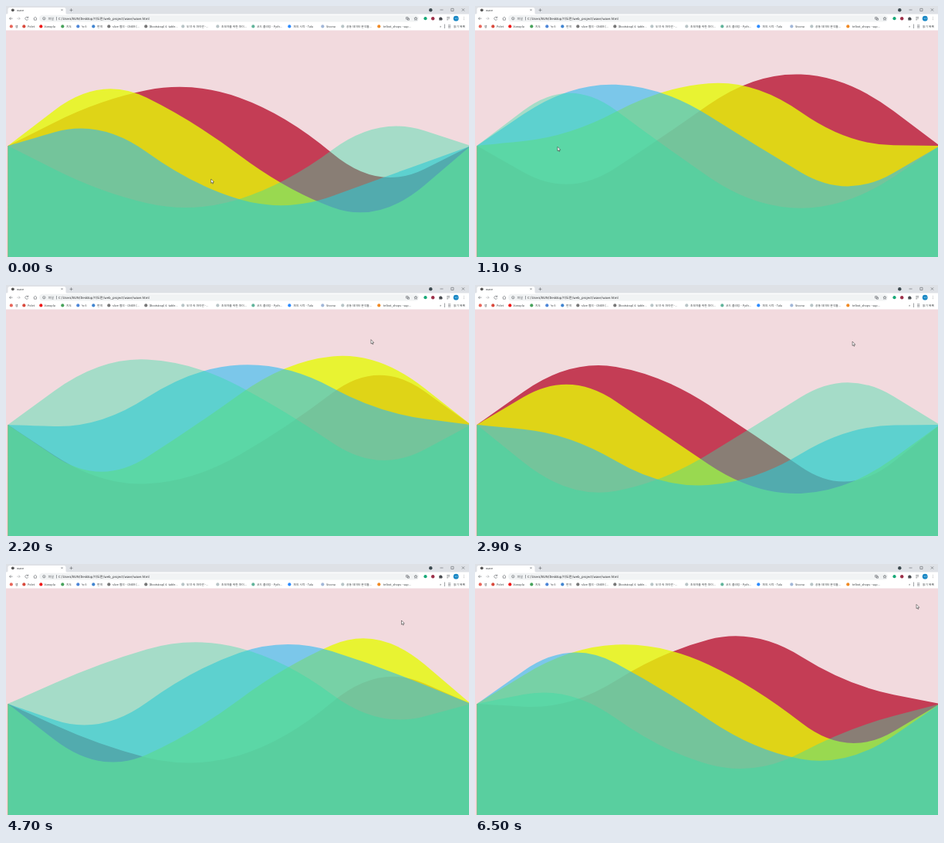
Recreate the animation shown at these times as an HTML page. Size 600x325 px, loop 6.6 s.

```html
<!DOCTYPE html>
<html lang="ko">
<head>
<meta charset="utf-8">
<title>wave</title>
<style>
  html, body { margin: 0; width: 100%; height: 100%; overflow: hidden; background: #f2dade; }
  svg { display: block; width: 100vw; height: 100vh; }
  text { font-family: "Noto Sans CJK KR", "Noto Sans CJK", "Open Sans", sans-serif; text-rendering: geometricPrecision; fill: #3c4043; }
  .line { fill: none; stroke: #5f6368; stroke-width: .6; }
</style>
</head>
<body>
<svg viewBox="0 0 600 325" preserveAspectRatio="none">
  <rect width="600" height="325" fill="#f2dade"/>
  <g id="waves"></g>
  <g id="browser">
    <rect width="600" height="11" fill="#dee1e6"/>
    <path d="M0 11Q2.5 11 2.5 8.500V4.500Q2.500 2 5 2H75Q77.500 2 77.500 4.500V8.500Q77.500 11 80 11Z" fill="#fff"/>
    <rect y="10.500" width="600" height="21" fill="#fff"/>
    <rect x="43" y="11.700" width="492" height="8.800" rx="4.400" fill="#f1f3f4"/>
    <path class="line" d="M71.500 4.200l2 2m0-2l-2 2M82.500 5.300h4m-2-2v4"/>
    <path class="line" d="M562.500 5h4M576.800 3.300h3.200v3.200h-3.200zM590.800 3.300l3.300 3.300m0-3.300l-3.300 3.300"/>
    <path class="line" d="M8.500 16.200h-4m1.800-1.800l-1.800 1.800 1.800 1.800"/>
    <path class="line" d="M14.200 16.200h4m-1.800-1.800l1.800 1.800-1.800 1.800" opacity=".5"/>
    <path class="line" d="M28.500 15.100a2 2 0 1 0 .2 1.900M28.800 13.600v1.700h-1.700"/>
    <path class="line" d="M35.700 16.200l2.200-2 2.200 2M36.400 16v2.200h3V16"/>
    <circle class="line" cx="49.300" cy="16.200" r="1.700"/>
    <path class="line" d="M49.300 15.900v1.300M65.500 14v4.500"/>
    <path class="line" d="M518.500 14.500h2.500v2.500h-2.500zM520.300 16h2.200v2.200h-2.200z"/>
    <path class="line" d="M531 14.200l.6 1.500 1.500.1-1.200 1 .4 1.500-1.300-.8-1.300.8.4-1.500-1.200-1 1.500-.1z"/>
    <path d="M561.300 15h1.200a.8.800 0 0 1 1.600 0h1v1.200a.8.800 0 0 1 0 1.600v.8h-3.800z" fill="#4a4d51"/>
    <path class="line" d="M571.200 14.500h4M571.200 16.200h4M571.200 17.900h2"/>
    <path class="line" d="M568.500 23.500v5.500M573 24.800h3.300M573 26.400h3.300M573 28h3.300"/>
  </g>
  <path id="cursor" d="M0 0V5.400L1.200 4.300 2 6.200 2.900 5.800 2.100 4H3.800Z" fill="#fff" stroke="#222" stroke-width=".5"/>
</svg>
<script>
const LOOP = 6600, STEP = 100;
const LEFT = 2.5, GAP = 120, CENTER = 181, BOTTOM = 326;

const waves = [
  { color: "#c43d55", alpha: 1, swing: [89, 85, 105, 106] },
  { color: "#e6fa08", alpha: 0.8, swing: [93, 84, 101, 102] },
  { color: "#2ebbf3", alpha: 0.6, swing: [90, 91, 87, 84] },
  { color: "#30dea6", alpha: 0.4, swing: [107, 88, 97, 88] },
];

// [time, phase, cursor x, cursor y]
const keys = [
  [0, -2.4, 265.700, 224],
  [1100, 2.27, 107, 182.300],
  [2200, 7.38, 473, 70.700],
  [3700, 14.48, 507.500, 76],
  [4700, 19.51, 512.500, 73],
  [5500, 23.26, 549, 64],
  [6500, 28.19, 572, 52.300],
];

const browser = document.getElementById("browser");
const cursor = document.getElementById("cursor");

function add(parent, tag, attrs, content = "") {
  const node = document.createElementNS("http://www.w3.org/2000/svg", tag);
  for (const name in attrs) node.setAttribute(name, attrs[name]);
  node.textContent = content;
  parent.append(node);
  return node;
}

const label = (x, y, content, size = 3.75, fill = "#3c4043") =>
  add(browser, "text", { x, y, "font-size": size, style: `fill:${fill}` }, content);
const dot = (cx, cy, r, fill) => add(browser, "circle", { cx, cy, r, fill });

function buildBrowser() {
  label(14, 6.7, "wave");
  label(54.5, 17.7, "파일", 4.2, "#5f6368");
  label(68, 17.7, "C:/Users/BUN/Desktop/이도란/web_project/wave/wave.html", 4.2, "#202124");
  dot(8.8, 5.3, 1.9, "#555");
  dot(550.3, 5.2, 2.2, "#3c4a50");
  dot(543.5, 16.2, 2.1, "#18a878");
  dot(553.2, 16.2, 2.2, "#9c3049");
  dot(583.2, 16.2, 3.4, "#1686c4");
  label(581.5, 17.2, "도란", 2.2, "#fff");
  for (const y of [14.6, 16.2, 17.8]) dot(593.3, y, 0.4, "#5f6368");

  const bookmarks = [
    [4.5, "#e8665a", "앱", 12],
    [21, "#d94a3d", "Polet", 28],
    [43, "#f01818", "Vunopla", 49.5],
    [71, "#49a35c", "지도", 78],
    [91, "#4d86d8", "뉴스", 98],
    [111, "#4285d0", "번역", 118],
    [131, "#777", "slive 협의 - ONER (...", 138],
    [179, "#777", "(Bootstrap) 4. table...", 185.5],
    [227, "#b8c4c6", "도약 속 파이썬 -...", 234],
    [272, "#b8c4c6", "초보자를 위한 파이...", 279],
    [318, "#62b49b", "코드 플라잉 - Pyth...", 325],
    [365, "#2d8cff", "회의 시작 - Talu", 372.5],
    [408, "#a2b7d8", "Sivona", 415],
    [434, "#b8c4c6", "공동 데이터 분석툴...", 441],
    [481, "#f08a24", "telbot_shops - sup...", 489],
  ];
  for (const [x, color, name, textX] of bookmarks) {
    dot(x + 2.3, 26.4, 2.1, color);
    label(textX, 27.8, name);
  }
  label(562, 27.8, "»", 4.5);
  label(580, 27.8, "읽기 목록");
}

// Quadratic curves through the midpoints of neighbouring points; both ends stay fixed.
function wavePath(index, swing, phase) {
  const offsets = swing.map((max, i) => Math.sin(phase + index + i) * max);
  const points = [0, ...offsets, 0].map((dy, i) => [LEFT + GAP * i, CENTER + dy]);
  let [px, py] = points[0];
  let d = `M${px} ${py}`;
  for (const [x, y] of points) {
    d += `Q${px} ${py} ${(px + x) / 2} ${(py + y) / 2}`;
    [px, py] = [x, y];
  }
  return `${d}L${px} ${py}V${BOTTOM}H${LEFT}Z`;
}

function stateAt(time) {
  let i = 0;
  while (i < keys.length - 2 && time >= keys[i + 1][0]) i++;
  const from = keys[i], to = keys[i + 1];
  const k = (time - from[0]) / (to[0] - from[0]);
  return from.map((value, n) => value + (to[n] - value) * k);
}

function render(ms) {
  const time = Math.floor((ms % LOOP) / STEP) * STEP;
  const [, phase, x, y] = stateAt(time);
  waves.forEach((wave, i) => wave.path.setAttribute("d", wavePath(i, wave.swing, phase)));
  cursor.setAttribute("transform", `translate(${x} ${y})`);
}

buildBrowser();
for (const wave of waves) {
  wave.path = add(document.getElementById("waves"), "path", { fill: wave.color, "fill-opacity": wave.alpha });
}

const start = performance.now();
function tick() {
  render(performance.now() - start);
  requestAnimationFrame(tick);
}
tick();
</script>
</body>
</html>
```
